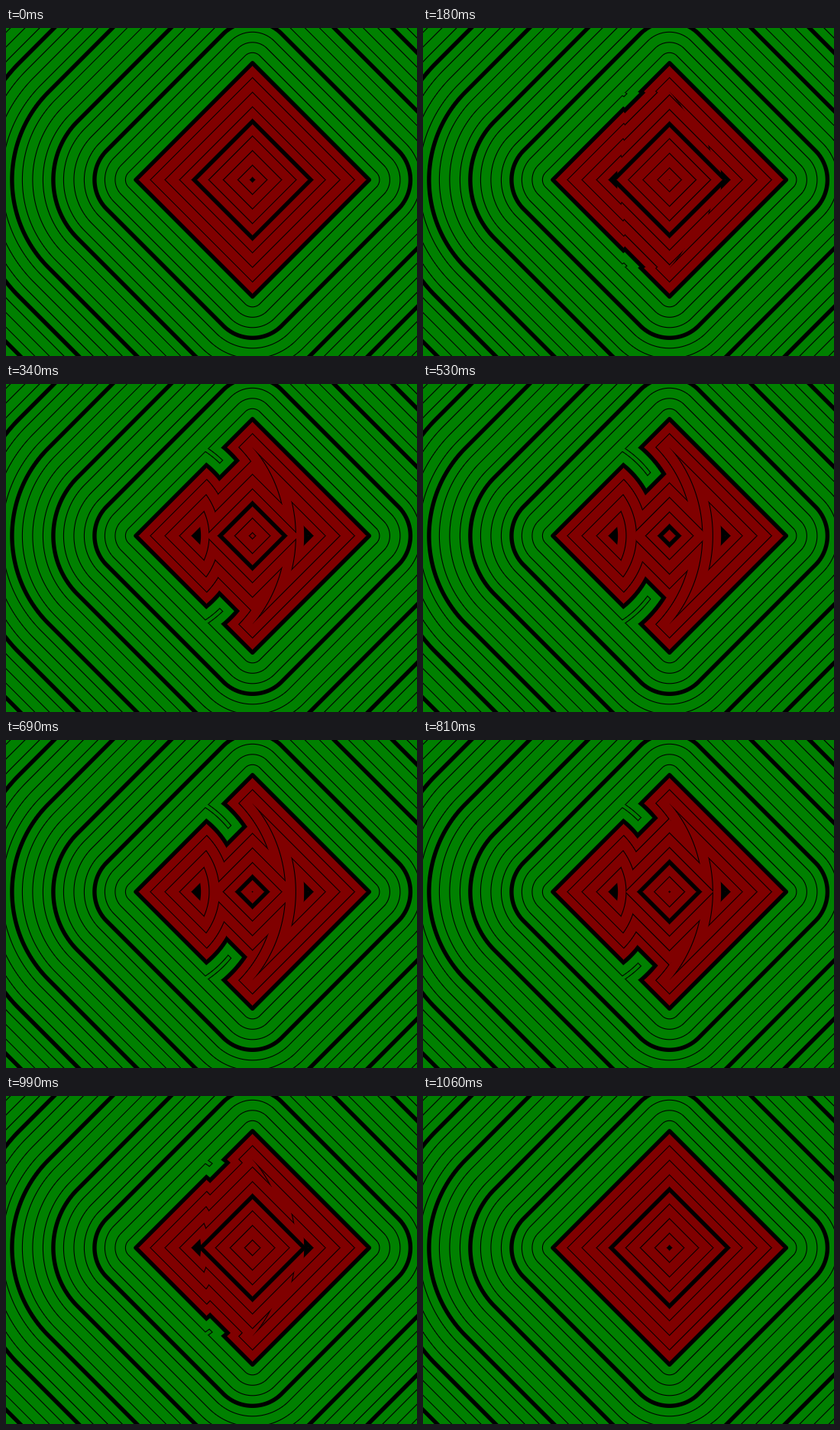
Animation of 538x429 px, one loop 1.29 s. Source, as an HTML page with a canvas:

```html
<!DOCTYPE html>
<html lang="en">
<head>
<meta charset="utf-8">
<title>Groove in a distance field</title>
<style>
  html, body { margin: 0; width: 100%; height: 100%; overflow: hidden; background: #008000; }
  canvas { display: block; }
</style>
</head>
<body>
<canvas id="stage" width="538" height="429"></canvas>
<script>
const W = 538, H = 429, LOOP = 1290;
const CX = 322.65, CY = 198.55;
const UNIT = 54, MINOR = UNIT / 4;
const HALF = 2 * UNIT;           // half side of the tilted square
const RADIUS = 2.5 * UNIT;       // circle the groove follows
const GROOVE = 0.3 * UNIT;       // half width of the groove
const BOLD = 0.05 * UNIT, THIN = 0.01 * UNIT;   // half line widths

// Groove depth: [ms, px], linear in between
const depthKeys = [[180, 2.3], [340, 24], [530, 45.4], [600, 51], [810, 26.6], [990, 6.4], [1060, 0]];

const ctx = document.getElementById("stage").getContext("2d");
const image = ctx.createImageData(W, H);
const clamp01 = v => Math.min(1, Math.max(0, v));
const length = (x, y) => Math.sqrt(x * x + y * y);

function square(x, y) {
  const u = Math.abs(x + y) * Math.SQRT1_2 - HALF;
  const v = Math.abs(x - y) * Math.SQRT1_2 - HALF;
  return length(Math.max(u, 0), Math.max(v, 0)) + Math.min(Math.max(u, v), 0);
}

function field(x, y, depth) {
  const a = square(x, y);
  const b = length(x + RADIUS, y) - RADIUS;
  return Math.max(a, Math.min(a + depth, GROOVE - Math.abs(b)));
}

// Coverage of contour lines repeated every gap
function contour(d, gap, halfWidth) {
  const away = Math.abs(d - gap * Math.round(d / gap));
  return clamp01(halfWidth + 0.5 - away);
}

function draw(depth) {
  const px = image.data;
  for (let y = 0, i = 0; y < H; y++) {
    for (let x = 0; x < W; x++, i += 4) {
      const d = field(x + 0.5 - CX, y + 0.5 - CY, depth);
      const ink = Math.max(contour(d, UNIT, BOLD), contour(d, MINOR, THIN));
      const shade = 128 * (1 - ink);
      px[i] = d < 0 ? shade : 0;
      px[i + 1] = d < 0 ? 0 : shade;
      px[i + 3] = 255;
    }
  }
  ctx.putImageData(image, 0, 0);
}

function depthAt(t) {
  const k = depthKeys.findIndex(([time]) => time > t);
  if (k < 1) return 0;
  const [t0, d0] = depthKeys[k - 1], [t1, d1] = depthKeys[k];
  return d0 + (d1 - d0) * (t - t0) / (t1 - t0);
}

let shown = -1;
const start = performance.now();

function tick() {
  const depth = depthAt((performance.now() - start) % LOOP);
  if (depth !== shown) {
    draw(depth);
    shown = depth;
  }
  requestAnimationFrame(tick);
}
tick();
</script>
</body>
</html>
```
